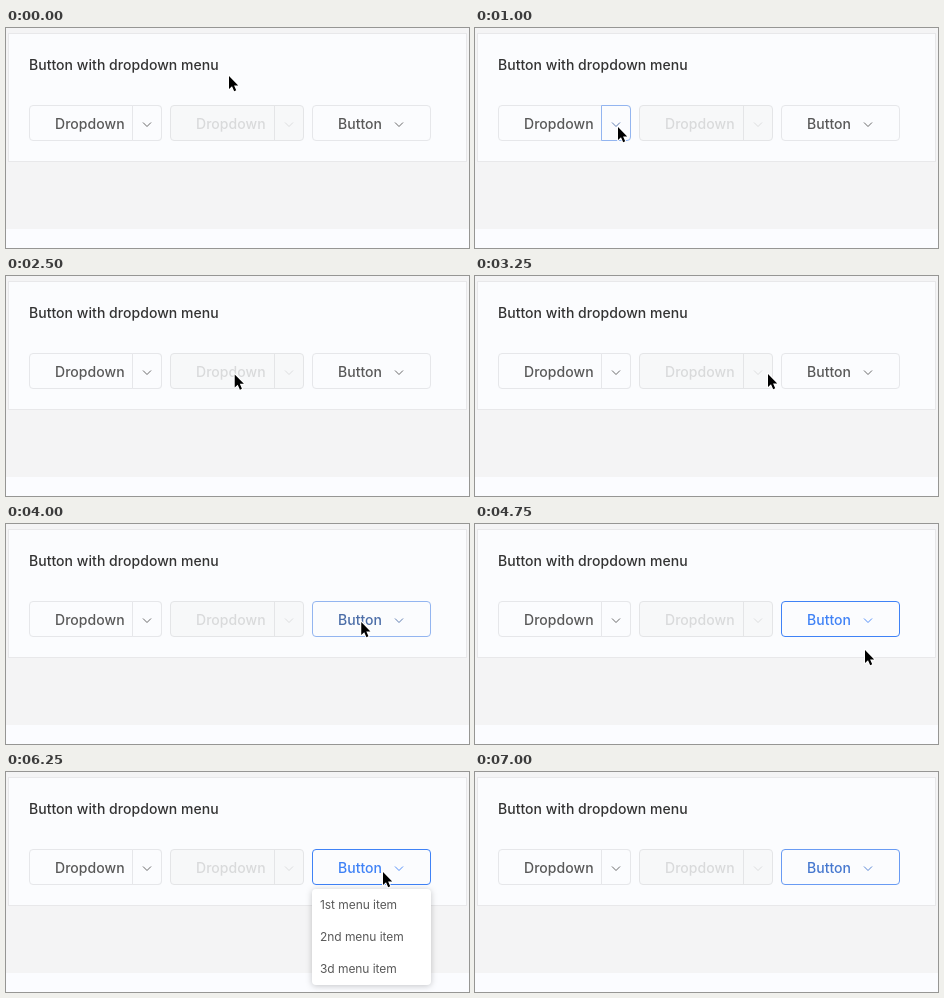
These frames come from a looping animation (463x220 px, 7250 ms). An HTML page:

```html
<!DOCTYPE html>
<html lang="en">
<head>
<meta charset="utf-8">
<title>Button with dropdown menu</title>
<style>
  html, body { margin: 0; width: 100%; height: 100%; overflow: hidden; background: #f4f4f5; }
  svg { display: block; font: 500 14px Inter, sans-serif; letter-spacing: .04px; }
  .button { --hover: 0%; --line: #e6e7ea; --ink: #595959; fill: #fbfcfe; }
  .button.disabled { --line: #e4e5e7; --ink: #d9dadb; fill: #f7f8f9; }
  .frame { stroke: color-mix(in srgb, #3f82f6 var(--hover), var(--line)); }
  .button text { fill: color-mix(in srgb, #3f82f6 var(--hover), var(--ink)); }
  .chevron { fill: none; stroke: color-mix(in srgb, #3f82f6 var(--hover), var(--ink)); stroke-width: .9; }
  .menu { font-size: 12px; font-weight: 400; letter-spacing: -.06px; fill: #595959; }
  .menu rect { fill: #fff; filter: drop-shadow(0 1px 3px rgba(0, 0, 0, .22)); }
</style>
</head>
<body>
<svg id="stage" width="463" height="220" viewBox="0 0 463 220"></svg>
<script>
  const LOOP = 7250, STEP = 250, FADE = 500;
  const TOP = 77.5, HEIGHT = 35, MENU_TOP = 117;
  const byId = id => document.getElementById(id);

  const frame = (x, width) =>
    `<rect class="frame" x="${x}" y="${TOP}" width="${width}" height="${HEIGHT}" rx="3.5"/>`;
  const label = (x, text) => `<text x="${x}" y="101">${text}</text>`;
  const chevron = x => `<path class="chevron" d="M${x - 4} 94.5l4 4 4-4"/>`;
  const button = (parts, id = '', style = '') =>
    `<g class="button ${style}" id="${id}">${parts}</g>`;
  const menu = (id, width) => `<g class="menu" id="${id}">
    <rect width="${width}" height="96" rx="4"/>
    ${['1st', '2nd', '3d'].map((nth, i) =>
      `<text x="8" y="${20 + 32 * i}">${nth} menu item</text>`).join('')}
  </g>`;

  byId('stage').innerHTML = `
    <rect y="201" width="463" height="19" fill="#fbfcff"/>
    <rect x="2.5" y="5.5" width="458" height="128" fill="#fbfcfe" stroke="#e8e8ea"/>
    <text x="23" y="42" fill="#333">Button with dropdown menu</text>
    ${button(frame(23.5, 132) + label(49, 'Dropdown'))}
    ${button(`<path class="frame" d="M126.5 ${TOP}h25.5q3.5 0 3.5 3.5v28q0 3.5-3.5 3.5h-25.5z"/>`
      + chevron(141), 'split')}
    ${button(frame(164.5, 133) + '<path class="frame" d="M268.5 78v34"/>'
      + label(190, 'Dropdown') + chevron(283), 'locked', 'disabled')}
    ${button(frame(306.5, 118) + label(332, 'Button') + chevron(393), 'single')}
    ${menu('splitMenu', 99)}
    ${menu('singleMenu', 119)}
    <path id="cursor" d="M0 0V13L3 10.2 5.2 15.2 7.2 14.3 5.1 9.4H9.2Z"
      stroke="#fff" stroke-width="2" stroke-linejoin="round" paint-order="stroke"/>`;

  // The pointer goes straight from stop to stop: [time, x, y].
  const stops = [
    [0, 223, 48], [500, 148, 55], [1000, 143, 99], [1500, 143, 99], [3250, 293, 98],
    [4250, 376, 98], [4750, 390, 126], [5500, 377, 54], [6250, 377, 100]
  ];
  const cursorExit = 6750;

  const ramp = (t, from, duration) => Math.min(1, Math.max(0, (t - from) / duration));

  // Rises evenly after `on`, eases away after `off`.
  const pulse = (t, on, off) => ramp(t, on, FADE) * (1 - ramp(t, off, FADE) ** 2);

  function cursorAt(t) {
    let [, x, y] = stops[0];
    for (let i = 1; i < stops.length; i++) {
      const [from, x0, y0] = stops[i - 1], [to, x1, y1] = stops[i];
      const k = ramp(t, from, to - from);
      x += (x1 - x0) * k;
      y += (y1 - y0) * k;
    }
    return [x, y];
  }

  function setHover(id, amount) {
    byId(id).style.setProperty('--hover', amount * 100 + '%');
  }

  function setMenu(id, x, open) {
    byId(id).setAttribute('opacity', open);
    byId(id).setAttribute('transform', `translate(${x} ${MENU_TOP}) scale(1 ${.8 + .2 * open})`);
  }

  function draw(now) {
    const t = Math.floor(now % LOOP / STEP) * STEP;
    setHover('split', pulse(t, 750, 2000));
    setHover('single', pulse(t, 3750, 6750));
    setMenu('splitMenu', 57, pulse(t, 1000, 2000));
    setMenu('singleMenu', 306, pulse(t, 4750, 6500));
    byId('cursor').setAttribute('transform', `translate(${cursorAt(t)})`);
    byId('cursor').setAttribute('visibility', t < cursorExit ? 'visible' : 'hidden');
  }

  const start = performance.now();
  function tick() {
    draw(performance.now() - start);
    requestAnimationFrame(tick);
  }
  tick();
</script>
</body>
</html>
```
